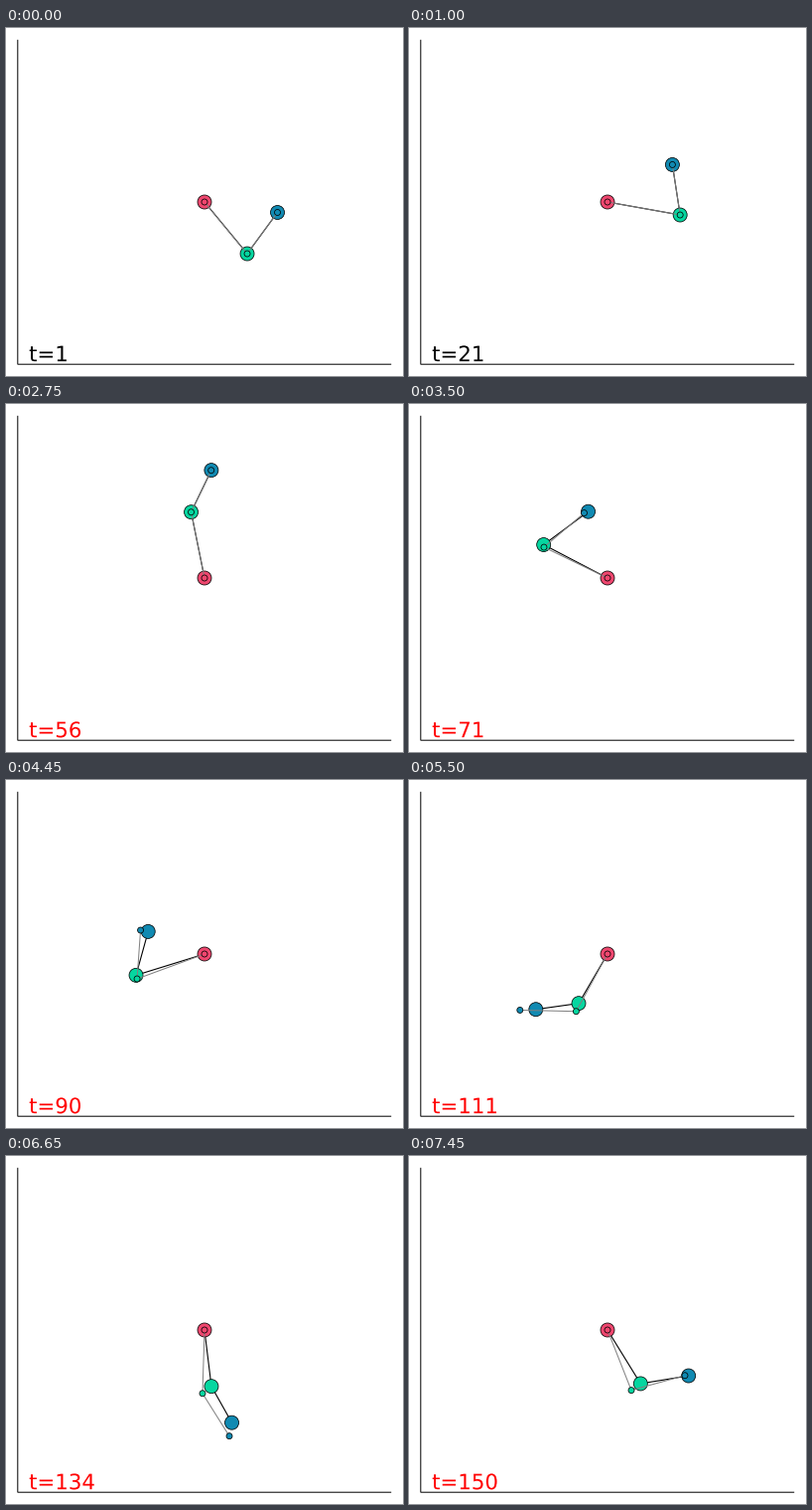
These frames come from a looping animation (400x350 px, 7500 ms). A matplotlib script:

```python
import matplotlib.pyplot as plt
import numpy as np
from matplotlib.animation import FuncAnimation
from matplotlib.patches import PathPatch
from matplotlib.textpath import TextPath
from matplotlib.transforms import Affine2D

W, H, DPI = 400, 350, 100
FRAMES, INTERVAL = 150, 50
WARMUP = 25  # steps before the label turns red
PX = 72 / DPI
PIVOT = 200 + 175j
COLORS = ["#ef476f", "#06d6a0", "#118ab2"]

# Key poses: upper angle, upper length, lower angle, lower length
# (degrees counter-clockwise from straight up, pixels)
STEPS = np.array([0, 24, 40, 54, 70, 89, 110, 133, 149])
SHARED = [(-140.4, 67.5, -36.3, 51.5), (-90, 74.3, 15, 51),
          (-40.2, 67.7, 27.1, 49.8), (8, 67.5, -23, 46.5)]
BIG = [(62.5, 72.5, -53.4, 55.9), (107.2, 72.2, -15.5, 45.6),
       (149.7, 57.5, 98, 43.6), (187, 57.1, 209.4, 41.9),
       (211.7, 63.4, 279.3, 49)]
SMALL = [(64.2, 71.1, -49.6, 53.2), (110.2, 72.4, -4.1, 49.1),
         (151.3, 65.8, 88.7, 56.6), (178.2, 63.8, 212.2, 50.7),
         (201.6, 65.2, 285.4, 56)]


def smooth(keys, t):
    """Cubic Hermite curve through the key poses."""
    y = np.array(keys)
    m = np.gradient(y, STEPS, axis=0)
    i = min(np.searchsorted(STEPS, t, side="right") - 1, len(STEPS) - 2)
    h = STEPS[i + 1] - STEPS[i]
    s = (t - STEPS[i]) / h
    return ((1 + 2 * s) * (1 - s) ** 2 * y[i] + s * (1 - s) ** 2 * h * m[i]
            + s * s * (3 - 2 * s) * y[i + 1] + s * s * (s - 1) * h * m[i + 1])


fig = plt.figure(figsize=(W / DPI, H / DPI), dpi=DPI, facecolor="white")
ax = fig.add_axes([0, 0, 1, 1])
ax.set_xlim(0, W)
ax.set_ylim(H, 0)
ax.axis("off")

ax.plot([11.8, 11.8, 388.2], [11.8, 338.2, 338.2], color="black", lw=PX,
        snap=False, solid_joinstyle="miter", solid_capstyle="butt")


def label_path(text):
    return TextPath((0, 0), text, size=21.3, prop={"family": "DejaVu Sans"})


label = ax.add_patch(PathPatch(
    label_path("t=1"), lw=0, zorder=5,
    transform=Affine2D().scale(1, -1).translate(23.1, 335.2) + ax.transData))


class Pendulum:
    def __init__(self, keys, color, width, radius, z):
        self.keys = SHARED + keys
        self.rod, = ax.plot([], [], color=color, lw=width * PX, zorder=z)
        self.dots = ax.scatter(
            [0] * 3, [0] * 3, s=(2 * radius * PX) ** 2, c=COLORS,
            edgecolors="black", linewidths=0.75 * PX, zorder=z + 0.5)

    def move(self, t):
        a1, l1, a2, l2 = smooth(self.keys, t)
        elbow = PIVOT - 1j * l1 * np.exp(-1j * np.radians(a1))
        tip = elbow - 1j * l2 * np.exp(-1j * np.radians(a2))
        p = np.array([PIVOT, elbow, tip])
        self.rod.set_data(p.real, p.imag)
        self.dots.set_offsets(np.column_stack([p.real, p.imag]))


pendulums = [Pendulum(BIG, "black", 1.1, 7, 1),
             Pendulum(SMALL, "#808080", 1.0, 3, 2)]


def update(n):
    for p in pendulums:
        p.move(n)
    label.set_path(label_path(f"t={n + 1}"))
    label.set_facecolor("black" if n + 1 <= WARMUP else "red")
    return [label]


anim = FuncAnimation(fig, update, frames=FRAMES, interval=INTERVAL,
                     repeat=True, repeat_delay=0)
plt.show()
```
